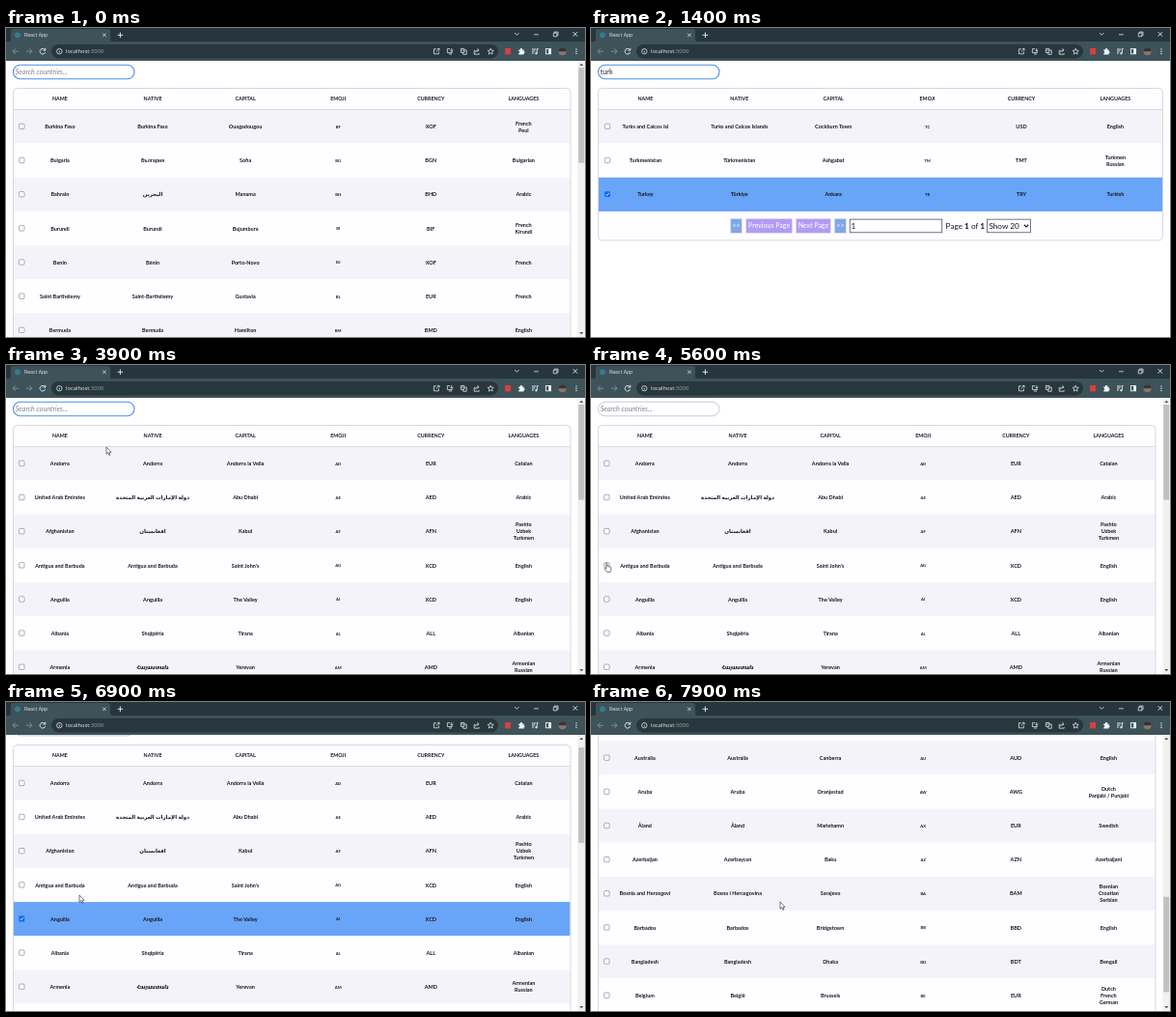
Write an HTML page that moves like this. It is 600 by 320 pixels and loops after 8000 ms.

```html
<!DOCTYPE html>
<html lang="en">
<head>
<meta charset="utf-8">
<title>React App</title>
<style>
html, body { margin: 0; width: 100%; height: 100%; overflow: hidden; background: #fff; }
svg { display: block; width: 600px; height: 320px; }
text { font-family: Lato, "Noto Sans", "DejaVu Sans", sans-serif; white-space: pre; }
.cell { font-size: 5.5px; font-weight: 700; text-anchor: middle; fill: #17171f; }
.head { font-size: 5.3px; }
.code { font-size: 4.2px; }
.field { font-size: 7.2px; fill: #222; }
.hint { font-style: italic; fill: #80838c; }
.btn { font-size: 7px; fill: #fff; text-anchor: middle; }
.pager { font-size: 8.2px; fill: #16161c; }
.ui { font-family: "Open Sans", "Noto Sans", sans-serif; }
.icon { fill: none; stroke: #dfe6e8; stroke-width: .8; }
</style>
</head>
<body>
<svg viewBox="0 0 600 320">
  <g id="page"></g>
  <g id="chrome"></g>
  <g id="pointer"></g>
</svg>
<script>
const LOOP = 8000, TICK = 100, TOP = 34, ROW = 35.15, FIRST = 84.5;

// code|name|native|capital|currency|languages
const countries = `AD|Andorra|Andorra|Andorra la Vella|EUR|Catalan
AE|United Arab Emirates|دولة الإمارات العربية المتحدة|Abu Dhabi|AED|Arabic
AF|Afghanistan|افغانستان|Kabul|AFN|Pashto,Uzbek,Turkmen
AG|Antigua and Barbuda|Antigua and Barbuda|Saint John's|XCD|English
AI|Anguilla|Anguilla|The Valley|XCD|English
AL|Albania|Shqipëria|Tirana|ALL|Albanian
AM|Armenia|Հայաստան|Yerevan|AMD|Armenian,Russian
AO|Angola|Angola|Luanda|AOA|Portuguese
AQ|Antarctica|Antarctica|||
AR|Argentina|Argentina|Buenos Aires|ARS|Spanish,Guarani
AS|American Samoa|American Samoa|Pago Pago|USD|English,Samoan
AT|Austria|Österreich|Vienna|EUR|German
AU|Australia|Australia|Canberra|AUD|English
AW|Aruba|Aruba|Oranjestad|AWG|Dutch,Panjabi / Punjabi
AX|Åland|Åland|Mariehamn|EUR|Swedish
AZ|Azerbaijan|Azərbaycan|Baku|AZN|Azerbaijani
BA|Bosnia and Herzegovi|Bosna i Hercegovina|Sarajevo|BAM|Bosnian,Croatian,Serbian
BB|Barbados|Barbados|Bridgetown|BBD|English
BD|Bangladesh|Bangladesh|Dhaka|BDT|Bengali
BE|Belgium|België|Brussels|EUR|Dutch,French,German
BF|Burkina Faso|Burkina Faso|Ouagadougou|XOF|French,Peul
BG|Bulgaria|България|Sofia|BGN|Bulgarian
BH|Bahrain|البحرين|Manama|BHD|Arabic
BI|Burundi|Burundi|Bujumbura|BIF|French,Kirundi
BJ|Benin|Bénin|Porto-Novo|XOF|French
BL|Saint Barthélemy|Saint-Barthélemy|Gustavia|EUR|French
BM|Bermuda|Bermuda|Hamilton|BMD|English
PT|Portugal|Portugal|Lisbon|EUR|Portuguese
TC|Turks and Caicos Isl|Turks and Caicos Islands|Cockburn Town|USD|English
TM|Turkmenistan|Türkmenistan|Ashgabat|TMT|Turkmen,Russian
TN|Tunisia|تونس|Tunis|TND|Arabic
TR|Turkey|Türkiye|Ankara|TRY|Turkish
TV|Tuvalu|Tuvalu|Funafuti|AUD|English
VU|Vanuatu|Vanuatu|Port Vila|VUV|Bislama`.split("\n").map(line => {
  const [code, name, native, capital, currency, langs] = line.split("|");
  return { code, name, native, capital, currency, langs: langs.split(",") };
});

// [time, value] steps that hold until the next one
const typed = [[0, ""], [300, "t"], [500, "tu"], [600, "tur"], [900, "turk"], [2000, "tur"], [2500, "tu"], [2700, "t"], [3100, ""]];
const chosen = [[0, ""], [900, "TR"], [2500, ""], [5800, "AG"], [6200, "AI"]];
const caretOn = [[0, false], [300, true], [1400, false], [1900, true], [3600, false], [4100, true], [4600, false]];
const focused = [[0, true], [4700, false]];
const shape = [[0, ""], [3600, "arrow"], [5300, "hand"], [6400, "arrow"]];

// [time, ...values] joined by straight lines
const track = [[3600, 165, 160], [3900, 104, 85], [4100, 104, 85], [4500, 142, 62], [4900, 72, 178], [5300, 20, 204],
  [5600, 15, 205], [5900, 15, 205], [6100, 15, 240], [6300, 15, 240], [6600, 72, 204], [6900, 76, 200],
  [7200, 91, 191], [7500, 140, 198], [7900, 196, 207]];
const scrolled = [[6700, 0], [6900, 18], [7000, 95], [7200, 283], [7400, 370], [7600, 425], [7900, 466]];

const held = (steps, t) => steps.filter(s => s[0] <= t).pop()[1];
function along(points, t) {
  if (t <= points[0][0]) return points[0].slice(1);
  const i = points.findIndex(p => p[0] > t);
  if (i < 0) return points[points.length - 1].slice(1);
  const [a, b] = [points[i - 1], points[i]], k = (t - a[0]) / (b[0] - a[0]);
  return a.slice(1).map((v, n) => v + (b[n + 1] - v) * k);
}

const text = (x, y, s, cls, extra = "") => `<text x="${x}" y="${y}" class="${cls}" ${extra}>${s}</text>`;
const rect = (x, y, w, h, fill, extra = "") => `<rect x="${x}" y="${y}" width="${w}" height="${h}" fill="${fill}" ${extra}/>`;
const path = (d, extra = 'class="icon"') => `<path d="${d}" ${extra}/>`;
const circle = (x, y, r, fill) => `<circle cx="${x}" cy="${y}" r="${r}" fill="${fill}"/>`;

function searchBox(query, focus, caret) {
  const line = focus ? "#4f8fe6" : "#b4bccd";
  const end = 10 + [0, 2.6, 6.6, 9.3, 13][query.length];
  return rect(7.5, 38.2, 125.5, 14.6, "#fff", `rx="7.3" stroke="${line}" stroke-width="${focus ? 1.1 : .8}"`)
    + (query ? text(9.7, 47.6, query, "field") : text(9.7, 47.6, "Search countries...", "field hint"))
    + (caret ? rect(end, 41.5, .5, 8, "#222") : "");
}

function checkbox(x, y, on) {
  const [l, t] = [x - 2.7, y - 2.9];
  return on
    ? rect(l - .2, t - .2, 5.8, 5.8, "#0b6be8", 'rx="1"') + path(`M${l + 1} ${t + 2.8}l1.3 1.3l2.2-2.8`, 'fill="none" stroke="#fff" stroke-width=".8"')
    : rect(l, t, 5.4, 5.4, "#fff", 'rx="1" stroke="#777" stroke-width=".6"');
}

function tableRow(c, i, col, boxX, width, on) {
  const top = FIRST + i * ROW, mid = top + ROW / 2, base = mid + 2;
  const fill = on ? "#68a4f8" : i % 2 ? "#fefdff" : "#f5f3fa";
  const cells = [c.name, c.native, c.capital, c.code, c.currency]
    .map((s, n) => text(col(n), n === 3 ? base - .2 : base, s, n === 3 ? "cell code" : "cell")).join("");
  const langs = c.langs.map((s, n) => text(col(5), base + (n - (c.langs.length - 1) / 2) * 7, s, "cell")).join("");
  return rect(8, top, width - 1, ROW, fill) + checkbox(boxX, mid, on) + cells + langs;
}

function pager(y, pages, shift) {
  const button = (x, w, s, fill) => rect(x, y - 7.3, w, 14.6, fill, 'stroke="#d9d3ee" stroke-width=".5"')
    + text(x + w / 2, y + 2.3, s, "btn");
  return `<g transform="translate(${shift})">`
    + button(144.8, 11.4, "&lt;&lt;", "#7fa8e4") + button(160.8, 47.6, "Previous Page", "#b19cf4")
    + button(212.6, 35.6, "Next Page", "#b19cf4") + button(252.6, 11.6, "&gt;&gt;", "#7fa8e4")
    + rect(268.3, y - 6.8, 95.4, 13.6, "#fff", 'stroke="#62627a" stroke-width=".9"') + text(269.6, y + 2.8, "1", "pager")
    + text(367.6, y + 3.3, `Page <tspan font-weight="700">1</tspan> of <tspan font-weight="700">${pages}</tspan>`, "pager")
    + rect(410.4, y - 6.8, 45, 13.6, "#fff", 'stroke="#55555f" stroke-width=".8"') + text(412.4, y + 2.8, "Show 20", "pager")
    + path(`M448.8 ${y - 1.2}l2.2 2.3l2.2-2.3`, 'fill="none" stroke="#111" stroke-width="1.1"') + "</g>";
}

function scrollbar(offset, height) {
  const view = 320 - TOP, length = 273, thumb = view / height * length;
  const y = 41 + offset / (height - view) * (length - thumb);
  return rect(592.5, TOP, 7.5, view, "#f1f1f1") + rect(593.2, y, 6, thumb, "#c1c1c1")
    + path("M594.3 39l2-2.2l2 2.2z", 'fill="#505050"') + path("M594.3 315l2 2.2l2-2.2z", 'fill="#505050"');
}

function drawPage(t) {
  const query = held(typed, t), pick = held(chosen, t);
  const all = query
    ? countries.filter(c => c.name.toLowerCase().includes(query))
    : countries.slice(t < 300 ? 20 : 0);
  const rows = all.slice(0, 20);
  const count = query.length < 2 ? 20 : rows.length;
  const bottom = FIRST + count * ROW + 30, height = bottom - TOP + 8;
  const bar = height > 320 - TOP, offset = along(scrolled, t)[0];
  const width = bar ? 577.5 : 585, boxX = bar ? 16.3 : 17;
  const col = n => bar ? 55.9 + n * 96.1 : 56.4 + n * 97.4;
  const heads = ["NAME", "NATIVE", "CAPITAL", "EMOJI", "CURRENCY", "LANGUAGES"];

  return `<g transform="translate(0 ${-offset})">`
    + searchBox(query, held(focused, t), held(caretOn, t))
    + rect(7.5, 62.5, width, bottom - 62.5, "#fefdff", 'rx="4"')
    + heads.map((s, n) => text(col(n), 75.1, s, "cell head")).join("")
    + rows.map((c, i) => tableRow(c, i, col, boxX, width, c.code === pick)).join("")
    + rect(8, 84, width - 1, .6, "#c9c7d2")
    + rect(7.5, 62.5, width, bottom - 62.5, "none", 'rx="4" stroke="#cfcbdc" stroke-width=".8"')
    + pager(bottom - 15, query.length < 2 ? 13 : 1, bar ? -3.7 : 0)
    + "</g>" + (bar ? scrollbar(offset, height) : "");
}

function drawChrome() {
  const dim = 'fill="none" stroke="#84959a" stroke-width=".9"';
  const lit = 'fill="none" stroke="#eef3f4" stroke-width=".9"';
  return rect(0, 0, 600, 15, "#26363c") + rect(0, 14, 600, 20, "#3e5259")
    + path("M3 14q2 0 2-2V3q0-2 2-2H105q3 0 3 2V12q0 2 2 2z", 'fill="#3e5259"')
    + circle(12, 7.3, 2.9, "#2f7f90")
    + text(19, 9.3, "React App", "ui", 'font-size="5.2" fill="#e9eff0"')
    + path("M100.2 5.6l3.4 3.4m0-3.4l-3.4 3.4") + path("M115.6 7.3h5.6m-2.8-2.8v5.6", lit)
    + path("M527 5l2.3 2.3l2.3-2.3") + path("M547 6.8h4.8")
    + path("M567.3 5.2h3.6v3.6h-3.6zM568.4 5.2v-1.1h3.6v3.6h-1.1") + path("M587.6 4.2l4.4 4.4m0-4.4l-4.4 4.4", lit)
    + path("M13 24.2H7m2.8-2.8l-2.8 2.8l2.8 2.8", dim) + path("M21 24.2h6m-2.8-2.8l2.8 2.8l-2.8 2.8", dim)
    + path("M40.3 22.7A2.8 2.8 0 1 0 40.6 25.2M40.8 20.8v2.3h-2.3", lit)
    + rect(47, 17, 463, 14.4, "#27373d", 'rx="7.2"')
    + path("M58 24.2a2.7 2.7 0 1 1-5.4 0a2.7 2.7 0 1 1 5.4 0M55.3 24v1.6m0-2.9v.6")
    + text(62, 26.3, 'localhost<tspan fill="#9cabaf">:3000</tspan>', "ui", 'font-size="5.8" fill="#f0f4f5"')
    + path("M446 21.8h-2.6v5h5v-2.4M447 21.4h2v2M449 21.4l-3.2 3.2")
    + path("M460 21.6h-2.6v4h5v-1M459 27h3M461.8 21v3.2m-1.5-1.4l1.5 1.5l1.5-1.5")
    + path("M471.4 21.4h3.4v4h-3.4zM474.8 23h2.4v4.3h-3.4l-.6-1.8M472.2 23h1.6")
    + path("M486.6 23.4h-1.4v3.8h5v-1.2M486.4 25.4q.4-2.6 3.4-2.6m-1.4-1.6l1.7 1.6l-1.7 1.6")
    + path("M502.2 21.2l.9 2l2.2.2l-1.7 1.5l.5 2.2l-1.9-1.2l-1.9 1.2l.5-2.2l-1.7-1.5l2.2-.2z")
    + rect(517, 21, 6, 6.4, "#d6403f")
    + path("M531.3 22.4h1.6a1.1 1.1 0 1 1 2.1 0h1.6v1.8a1 1 0 1 1 0 2v1.3h-5.3v-1.5a1 1 0 1 0 0-2z", 'fill="#eef3f4"')
    + path("M545 22h4.2M545 24h3.2M545 26h2M550.3 26.2v-4.6h1.4", lit) + circle(549.4, 26.3, 1.1, "#eef3f4")
    + rect(559.4, 21.6, 5.2, 5.2, "none", 'stroke="#eef3f4" stroke-width=".9"') + rect(562.2, 21.6, 2.4, 5.2, "#eef3f4")
    + circle(576.6, 24.2, 4, "#8a7768") + path("M572.6 24.2a4 4 0 0 1 8 0z", 'fill="#343434"')
    + [21.9, 24.2, 26.5].map(y => circle(591, y, .7, "#eef3f4")).join("");
}

function drawPointer(t) {
  const kind = held(shape, t);
  if (!kind) return "";
  const [x, y] = along(track, t);
  const d = kind === "arrow"
    ? "M0 0V7.2L1.7 5.7L2.8 8.4L4 7.9L2.9 5.3H5.1Z"
    : "M.7 .6Q1.4-.2 2 .6V3.6Q3 3 3.4 3.8Q4.2 3.4 4.7 4.2Q5.6 4 5.8 4.8V6.8L5 9.4H1.6L-.8 6.4Q-1.2 5.2 .7 5.9Z";
  return `<g transform="translate(${x} ${y})">` + path(d, 'fill="#fff" stroke="#222" stroke-width=".6" stroke-linejoin="round"') + "</g>";
}

const layer = id => document.getElementById(id);
layer("chrome").innerHTML = drawChrome();
const start = performance.now();
let last = -1;
function frame() {
  const t = Math.floor(((performance.now() - start) % LOOP) / TICK) * TICK;
  if (t !== last) {
    last = t;
    layer("page").innerHTML = drawPage(t);
    layer("pointer").innerHTML = drawPointer(t);
  }
  requestAnimationFrame(frame);
}
frame();
</script>
</body>
</html>
```
